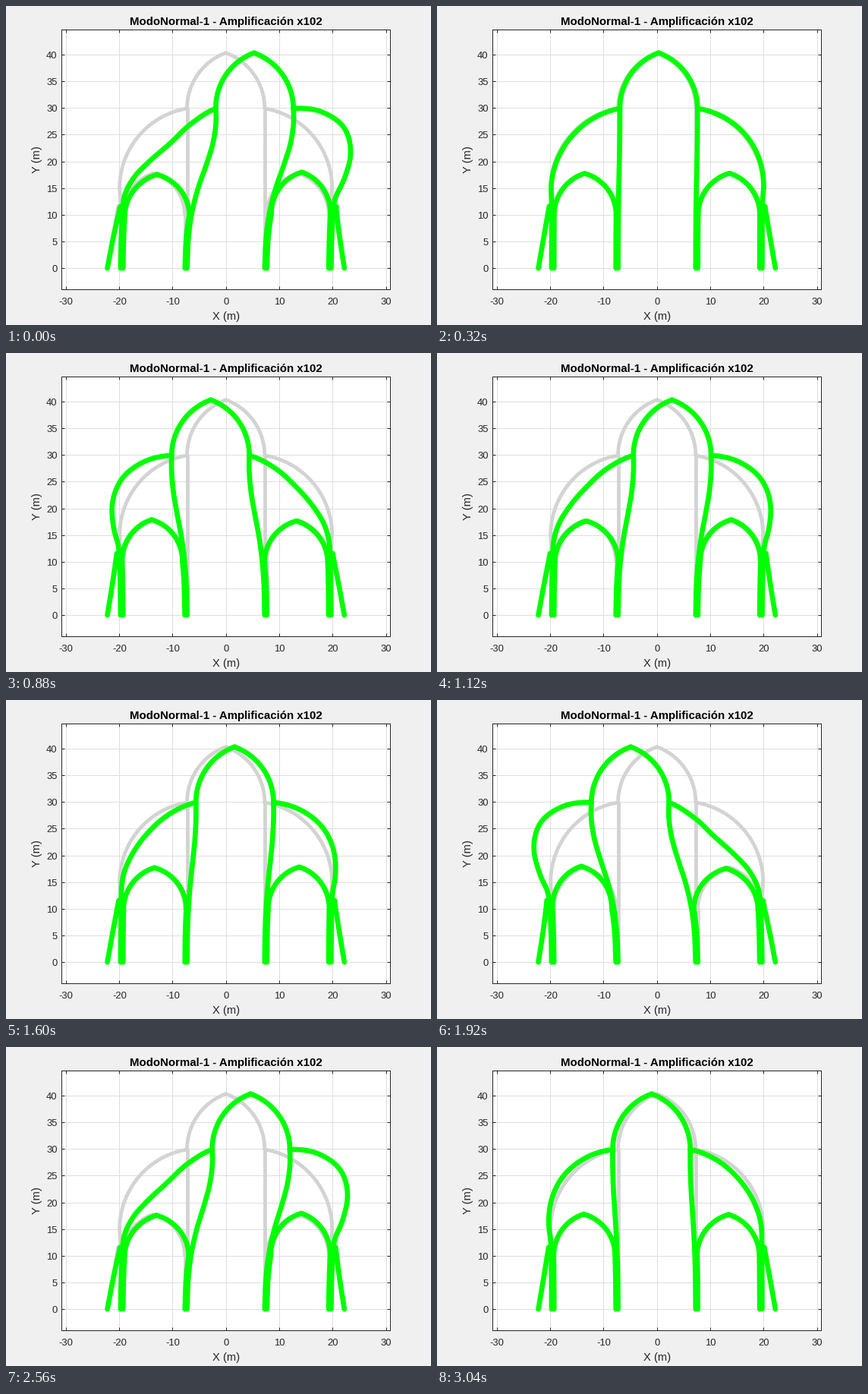
A matplotlib script for the animation above (3120 ms loop, 560 by 420 pixels).

```python
import numpy as np
import matplotlib.pyplot as plt
from matplotlib.animation import FuncAnimation

W, H, DPI = 560, 420, 100
PX = 72 / DPI                          # points per pixel
SCALE = 7.034                          # pixels per metre
LEFT, TOP, RIGHT, BOTTOM = 73, 31, 506, 373
X0, Y0 = 289.7, 345.2                  # pixel of the data origin
FRAMES, INTERVAL = 39, 80
INK, GRID, REST, MODE = "#262626", "#dedede", "#d3d3d3", "#00ff00"

plt.rcParams["font.family"] = "Liberation Sans"


def smooth(x, xs, ys):
    """Cubic Hermite curve through a few points."""
    xs, ys = np.asarray(xs, float), np.asarray(ys, float)
    m = np.gradient(ys, xs)
    i = np.clip(np.searchsorted(xs, x) - 1, 0, len(xs) - 2)
    h = xs[i + 1] - xs[i]
    t = (x - xs[i]) / h
    return ((1 + 2 * t) * (1 - t) ** 2 * ys[i] + t * (1 - t) ** 2 * h * m[i]
            + t * t * (3 - 2 * t) * ys[i + 1] + t * t * (t - 1) * h * m[i + 1])


def pointed(x0, y0, x1, y1, n=50):
    """Arc rising vertically from (x0, y0) to the crown (x1, y1)."""
    dx, dy = x1 - x0, y1 - y0
    r = (dx * dx + dy * dy) / (2 * abs(dx))
    a = np.linspace(0, np.arcsin(min(dy / r, 1)), n)
    return x0 + np.sign(dx) * r * (1 - np.cos(a)), y0 + r * np.sin(a)


def nave_sway(y):
    return smooth(y, [0, 6.4, 10.7, 15, 19.2, 23.5, 27.8, 30],
                  [0, .33, .97, 2.08, 3.55, 4.87, 5.44, 5.38])


def aisle_sway(y):
    return smooth(y, [0, 6, 10, 11.9, 13.6, 15],
                  [0, .13, .34, .48, .85, 1.49])


def half_arch_shift(a):
    """Bending of the half arch without stretching it along its axis."""
    out = smooth(np.degrees(a), [0, 10, 20, 40, 60, 80.6],
                 [1.49, 2.84, 4.22, 5.4, 3.84, .89])
    steps = np.diff(a) * (out[1:] + out[:-1]) / 2
    slip = -np.concatenate([[0], np.cumsum(steps)])
    return (out * np.cos(a) - slip * np.sin(a),
            out * np.sin(a) + slip * np.cos(a))


def right_half():
    """Members of the right half as (x, y, ux, uy)."""
    parts = []

    def add(x, y, ux, uy=0.0):
        parts.append(np.broadcast_arrays(x, y, ux, uy))

    # nave pier and crown
    y = np.linspace(0, 29.93, 70)
    add(7.27, y, nave_sway(y))
    x, y = pointed(7.27, 29.93, 0, 40.3)
    add(x, y, np.linspace(5.38, 5.27, len(x)))

    # outer pier and half arch
    y = np.linspace(0, 15, 45)
    add(np.interp(y, [11.6, 15], [19.72, 19.9]), y, aisle_sway(y))
    a = np.linspace(0, np.arccos(2.47 / 15.1), 90)
    add(4.8 + 15.1 * np.cos(a), 15 + 15.1 * np.sin(a), *half_arch_shift(a))

    # low aisle arch on its two piers
    spring, mid, top = 10, 13.57, 17.75
    for foot, sway in ((7.68, nave_sway), (19.26, aisle_sway)):
        y = np.linspace(0, spring, 35)
        add(foot, y, sway(y))
        x, y = pointed(foot, spring, mid, top)
        t = np.linspace(0, 1, len(x))
        base = sway(spring)
        add(x, y, base + (.65 - base) * t, .21 * np.sin(np.pi * t / 2))

    # sloping buttress
    y = np.linspace(0, 11.6, 35)
    add(22.2 - 2.01 * y / 11.6, y, aisle_sway(y))
    add(np.array([20.19, 19.72]), 11.6, aisle_sway(11.6))
    return parts


half = right_half()
members = half + [(-x, y, ux, -uy) for x, y, ux, uy in half]

fig = plt.figure(figsize=(W / DPI, H / DPI), dpi=DPI, facecolor="#f0f0f0")
ax = fig.add_axes([LEFT / W, 1 - BOTTOM / H, (RIGHT - LEFT) / W,
                   (BOTTOM - TOP) / H])
ax.set_xlim((LEFT - X0) / SCALE, (RIGHT - X0) / SCALE)
ax.set_ylim((Y0 - BOTTOM) / SCALE, (Y0 - TOP) / SCALE)
xticks, yticks = range(-30, 31, 10), range(0, 41, 5)
ax.set_xticks(xticks)
ax.set_yticks(yticks)
ax.set_axisbelow(True)
ax.grid(color=GRID, lw=PX)
ax.tick_params(direction="in", length=4.3 * PX, width=PX, color=INK, top=True,
               right=True, labelbottom=False, labelleft=False)
for spine in ax.spines.values():
    spine.set(color=INK, linewidth=PX)


def label(x, y, s, size, ha="center", color=INK, **kw):
    fig.text(x / W, 1 - y / H, s, fontsize=size * PX, ha=ha, va="baseline",
             color=color, **kw)


for v in xticks:
    label(290 + v * SCALE, 392.8, str(v), 13)
for v in yticks:
    label(67.5, 350.3 - v * SCALE, str(v), 13, ha="right")
label(290, 413.3, "X (m)", 14.8)
label(45.5, 202.5, "Y (m)", 14.8, rotation=90, rotation_mode="anchor")
label(289.5, 24.6, "ModoNormal-1 - Amplificación x102", 15, color="black",
      weight="bold")

round_ends = dict(solid_capstyle="round", solid_joinstyle="round")
for x, y, _, _ in members:
    ax.plot(x, y, color=REST, lw=4.8 * PX, zorder=2, **round_ends)
lines = [ax.plot([], [], color=MODE, lw=6.7 * PX, zorder=3, **round_ends)[0]
         for _ in members]


def draw(k):
    c = np.cos(0.12 * np.pi * k)
    for line, (x, y, ux, uy) in zip(lines, members):
        line.set_data(x + c * ux, y + c * uy)
    return lines


anim = FuncAnimation(fig, draw, frames=FRAMES, interval=INTERVAL,
                     repeat=True, repeat_delay=0)
plt.show()
```
